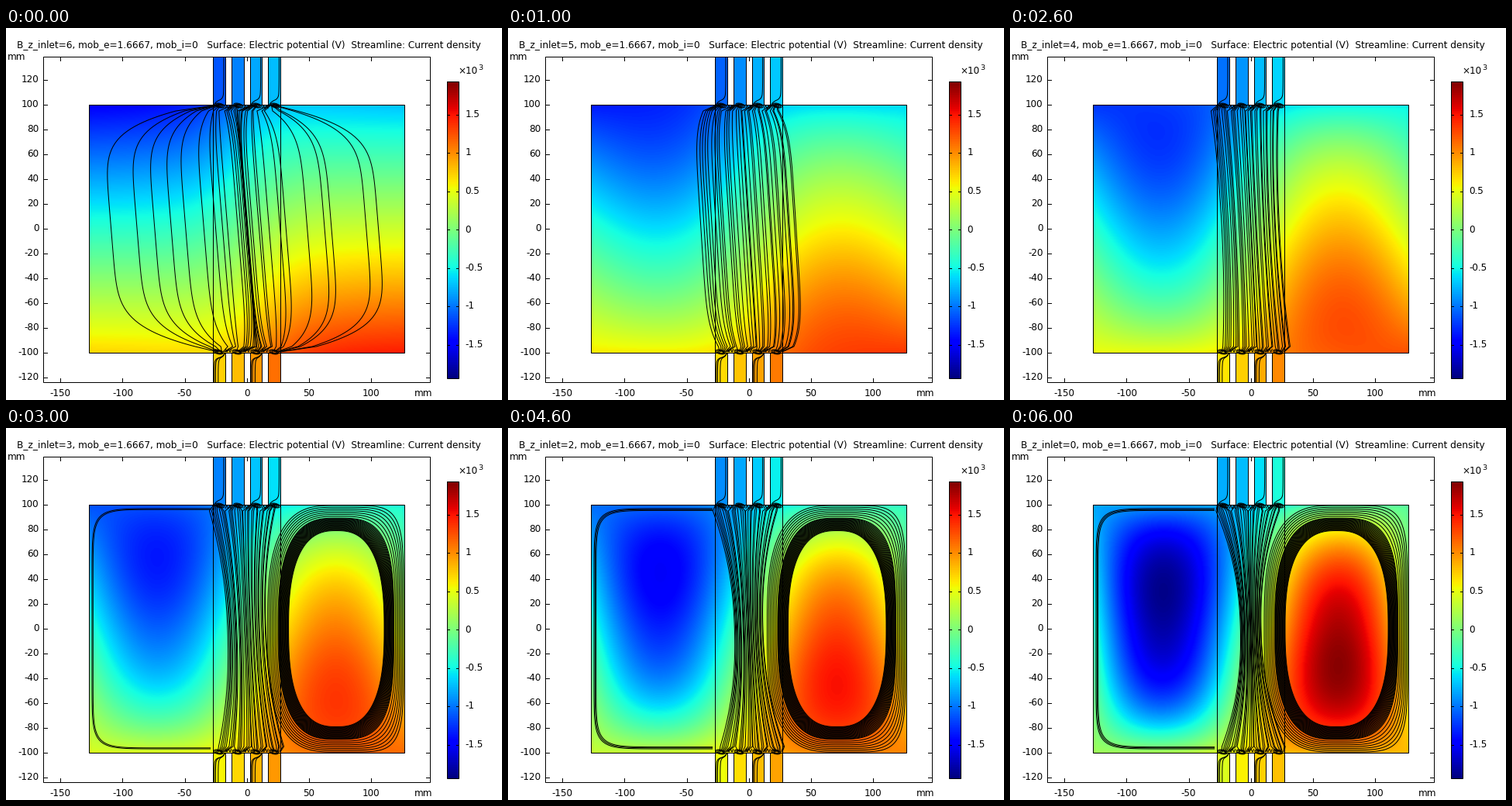
Write a matplotlib script that moves like this. It is 640 px wide and 480 px high and loops after 7000 ms.

```python
import numpy as np
import matplotlib.pyplot as plt
from matplotlib.animation import FuncAnimation
from matplotlib.collections import LineCollection
from matplotlib.patches import Rectangle

plt.rcParams["font.family"] = "DejaVu Sans"
PX = 0.72                                   # points per pixel at 100 dpi
CX, CY, SX, SY = 310.7, 258, 1.603, 1.6     # origin and pixels per mm
LEFT, RIGHT, TOP, BOTTOM = 107, 514, 98, 418
FRAME = (48, 36, 547, 456)
BAR = (569, 68, 584, 451)
CHANNELS = [(267 + 23.8 * i, 282.8 + 23.8 * i) for i in range(4)]
VMAX = 1.93                                 # colour range in kV
END = 46                                    # half-width of the inlet group
JET = plt.get_cmap("jet")


def potential(x, y, b):
    """Potential in kV at x, y in mm for inlet field b."""
    k = b / 6
    u, v = x / 127, y / 100
    slope = 0.67 + 0.2 * k + (0.44 * k - 0.2) * u**2 / (u**2 + 0.1)
    offset = (0.33 + 0.05 * k) * np.tanh(u / 0.3)
    hump = np.sign(u) * np.sin(np.pi * np.abs(u)**1.16)
    return (offset - slope * v
            + 1.48 * (1 - k) * hump * (1 - np.abs(v)**2.7))


def color(value):
    return JET((value + VMAX) / (2 * VMAX))


def smooth(points, rounds=3):
    """Round the corners of a polyline by repeated cutting."""
    p = np.array(points, float)
    for _ in range(rounds):
        a, b = p[:-1], p[1:]
        cut = np.stack([0.75 * a + 0.25 * b, 0.25 * a + 0.75 * b], 1)
        p = np.vstack([p[:1], cut.reshape(-1, 2), p[-1:]])
    return p


def mirror(p):
    return np.array([2 * CX, 2 * CY]) - p


def superellipse(x, rx, ry, n, angles):
    c, s = np.cos(angles), np.sin(angles)
    return np.column_stack([
        x + rx * np.sign(c) * np.abs(c)**(2 / n),
        CY + ry * np.sign(s) * np.abs(s)**(2 / n)])


def bundle(b):
    """Lines from the top inlets to the bottom outlets."""
    rng = np.random.default_rng(5)
    if b == 6:                  # free field: the outer lines fan out
        width, power = 195, 3
    else:                       # squeezed field: all lines keep together
        width, power = 12 + 52 * np.exp((b - 5) / 1.5), 1
    flat = 6 if width > END else 2.2
    tilt = 4 + b**2 / 4
    t = 0.95 * np.sin(np.linspace(np.pi / 2, -np.pi / 2, 80))
    bulge = 1 - np.abs(t)**flat
    lines = []
    for i, (lo, hi) in enumerate(CHANNELS):
        for d in np.linspace(-0.23, 0.23, 8):
            s = -0.75 + 0.5 * i + d + rng.uniform(-0.025, 0.025)
            end = s * END
            mid = width * np.sign(s) * np.abs(s)**power
            x = CX + end + (mid - end) * bulge - tilt * t
            xc = (lo + hi) / 2 + 20 * d
            lines.append(np.vstack([(xc - 3, TOP + 1),
                                    np.column_stack([x, CY - SY * 100 * t]),
                                    (xc + 3, BOTTOM - 1)]))
    return lines


def ring(b):
    """Nested loops of the right vortex, packed towards its core."""
    a = np.linspace(0, 2 * np.pi, 240)
    core = 355 + 3.2 * b
    lines = []
    for lam in np.r_[np.linspace(0, 1, 24), np.linspace(1.14, 2, 7)]:
        lo = core - 13.5 * lam
        hi = 488 + 12.5 * lam
        n = np.where(np.cos(a) > 0, 2.6 + 0.8 * lam**2, 2.6 + 0.2 * lam)
        lines.append(superellipse((lo + hi) / 2, (hi - lo) / 2,
                                  126.5 + 16.3 * lam, n, a))
    return lines


def wall(b):
    """Lines that hug the walls of the left half."""
    a = np.linspace(np.pi / 2, 3 * np.pi / 2, 300)
    return [superellipse(264, 153 - 1.3 * j, 155 - 1.2 * j, 10, a)
            for j in range(2 if b == 3 else 3)]


def eddies():
    """Small swirls at the channel mouths and ripples between them."""
    a = np.linspace(0, 2 * np.pi, 30)
    lines = []
    for lo, hi in CHANNELS:
        for r in (1, 0.75, 0.5):
            loop = np.column_stack([(lo + hi) / 2 + r + 6 * r * np.cos(a),
                                    TOP + 1 + 3 * r * np.sin(a + 0.4)])
            lines += [loop, mirror(loop)]
    for _, hi in CHANNELS[:-1]:
        x = np.linspace(hi, hi + 8, 20)
        ripple = np.column_stack([x, TOP + 3 + 2 * np.cos(1.6 * (x - hi))])
        lines += [ripple, mirror(ripple)]
    return lines


def inlet_lines():
    lines = []
    for i in (0, 2, 3):
        lo, hi = CHANNELS[i]
        x = hi - 1.8
        lines.append(smooth([(x, FRAME[1]), (x, 78), (x - 1, 90),
                             (lo + 4, 94), (lo, 100)]))
    for i in (0, 2):
        lo, hi = CHANNELS[i]
        for x in lo + 1.7 * 2.0**np.arange(3):
            lines.append(smooth([(x, FRAME[3]), (x, 436), (x + 1, 426),
                                 (hi - 3, 423), (hi, BOTTOM)]))
    return lines


def streamlines(b):
    lines = bundle(b) + eddies() + inlet_lines()
    if b <= 3:                  # closed vortices appear in weak fields
        lines += ring(b) + wall(b)
    return lines


fig = plt.figure(figsize=(6.4, 4.8), dpi=100, facecolor="white")
ax = fig.add_axes([0, 0, 1, 1])


def text(x, y, s, ha="left", size=12):
    return ax.text(x, y, s, ha=ha, va="baseline", fontsize=size * PX,
                   zorder=9)


def segment(x0, y0, x1, y1):
    ax.plot([x0, x1], [y0, y1], color="black", lw=PX, zorder=6)


def box(x0, y0, x1, y1, z=6):
    return ax.add_patch(Rectangle((x0, y0), x1 - x0, y1 - y0, lw=PX,
                                  facecolor="none", edgecolor="black",
                                  zorder=z))


def ticks_x(x, y0, y1, size):
    segment(x, y0, x, y0 + size)
    segment(x, y1, x, y1 - size)


def ticks_y(y, x0, x1, size):
    segment(x0, y, x0 + size, y)
    segment(x1, y, x1 - size, y)


gx, gy = np.meshgrid((np.arange(LEFT, RIGHT) + 0.5 - CX) / SX,
                     (CY - np.arange(TOP, BOTTOM) - 0.5) / SY)
surface = ax.imshow(potential(gx, gy, 6), cmap=JET, vmin=-VMAX, vmax=VMAX,
                    extent=(LEFT, RIGHT, BOTTOM, TOP), aspect="auto",
                    zorder=1)
ax.imshow(np.linspace(1, 0, 383)[:, None], cmap=JET, aspect="auto", zorder=1,
          extent=(BAR[0], BAR[2], BAR[3], BAR[1]))

ducts = []
for lo, hi in CHANNELS:
    x_mm = ((lo + hi) / 2 - CX) / SX
    ducts.append((box(lo, FRAME[1], hi, TOP, 2), x_mm, 100))
    ducts.append((box(lo, BOTTOM, hi, FRAME[3], 2), x_mm, -100))
flow = ax.add_collection(LineCollection([], colors="black", linewidths=PX,
                                        zorder=4))

box(LEFT, TOP, RIGHT, BOTTOM)
for x in (CHANNELS[0][0], CHANNELS[-1][1]):
    segment(x, TOP, x, BOTTOM)
box(*FRAME)
box(*BAR)

for mm in range(-150, 101, 50):
    x = CX + SX * mm
    ticks_x(x, FRAME[1], FRAME[3], 5)
    text(x, 474, str(mm), "center")
for mm in range(-120, 121, 20):
    y = CY - SY * mm
    ticks_y(y, FRAME[0], FRAME[2], 5)
    text(42.5, y + 3, str(mm), "right")
for v in np.arange(-1.5, 1.6, 0.5):
    y = 259 - 99 * v
    ticks_y(y, BAR[0], BAR[2], 3)
    text(592.5, y + 3.5, f"{v:g}")
text(2, 40, "mm")
text(527, 474, "mm")
text(583.5, 58, "×10")
text(609, 53, "3", size=9.5)
title = text(14, 25, "", size=12.08)

# snapped lines land on whole pixels with these limits
ax.set_xlim(0, 640)
ax.set_ylim(479, -1)
ax.axis("off")


def draw(step):
    b = 6 - step
    title.set_text(f"B_z_inlet={b}, mob_e=1.6667, mob_i=0   Surface: Electric "
                   "potential (V)  Streamline: Current density")
    surface.set_data(potential(gx, gy, b))
    for patch, x, y in ducts:
        patch.set_facecolor(color(potential(x, y, b)))
    flow.set_segments(streamlines(b))
    return []


anim = FuncAnimation(fig, draw, frames=7, interval=1000, repeat=True,
                     repeat_delay=0, blit=False)
plt.show()
```
